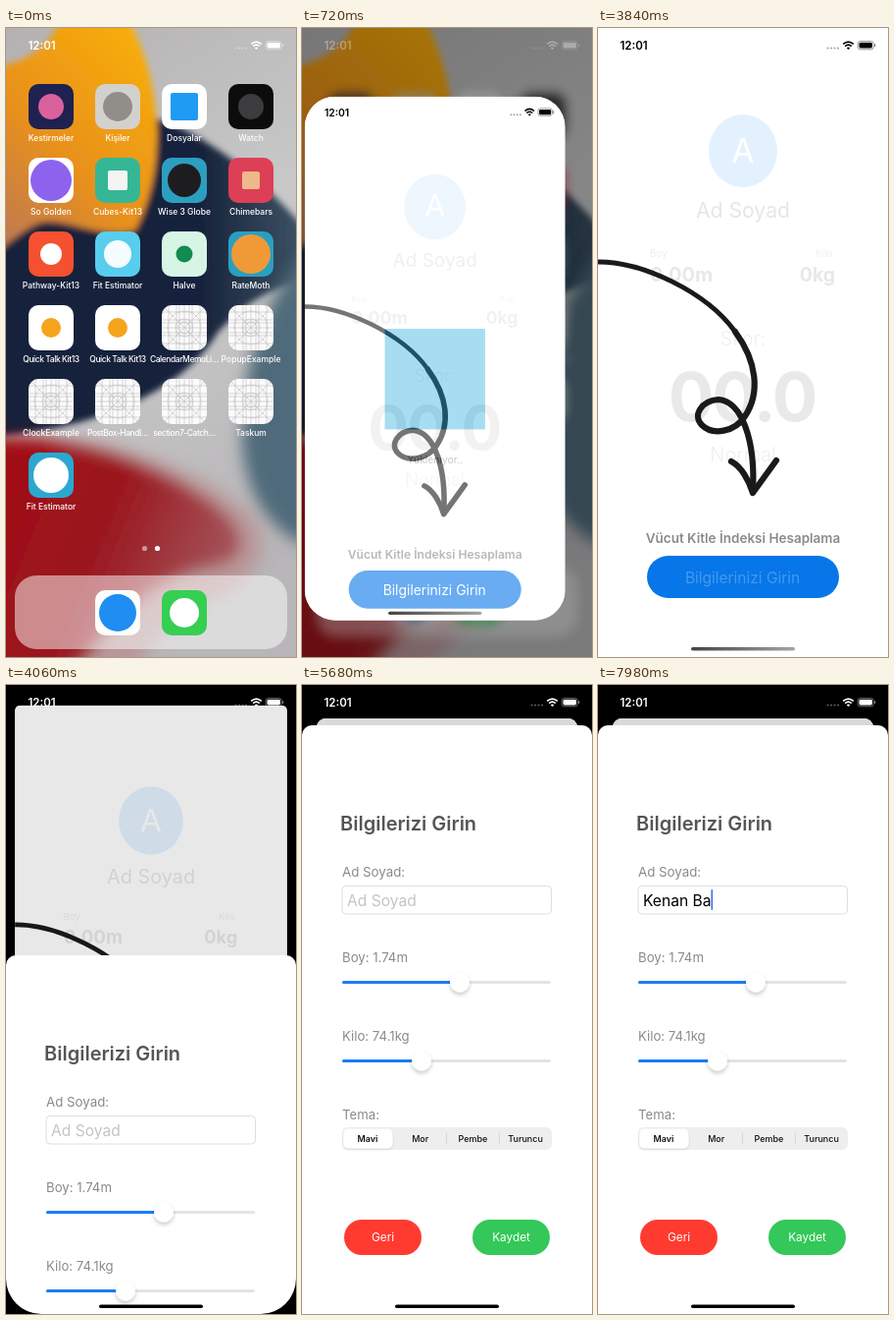
An HTML page for the animation above (8 s loop, 296x640 px).

```html
<!DOCTYPE html>
<html lang="tr">
<head>
<meta charset="utf-8">
<title>Uygulama</title>
<style>
  html, body { margin: 0; width: 100%; height: 100%; overflow: hidden; background: #000; }
  svg { display: block; width: 296px; height: 640px; }
  text { font-family: Inter, Roboto, "Liberation Sans", sans-serif; white-space: pre; }
</style>
</head>
<body>
<svg id="stage" viewBox="0 0 296 640" xmlns="http://www.w3.org/2000/svg"></svg>
<script>
const LOOP = 8000, STEP = 110;
const OPEN = 500, PRESS = 3840, SETTLE = 5680, FOCUS = 6260;

// Window opening: width progress, height progress, app fade-in
const GROW = [.2, .674, .88, .955, .985, 1];
const TALL = [.12, .566, .82, .93, .98, 1];
const FADE = [0, .35, .6, .8, .95, 1];
// Top edge of the sheet while it slides up
const SHEET_Y = [640, 510, 275, 130, 66, 42];

const TYPED = 'Kenan Ba';
const KEYS = [[6580, 2], [6920, 4], [7120, 5], [7310, 6], [7770, 7], [7980, 8]];

// ---- drawing helpers ----
const rect = (x, y, w, h, r, fill, more = '') =>
  `<rect x="${x}" y="${y}" width="${w}" height="${h}" rx="${r}" fill="${fill}" ${more}/>`;
const disc = (x, y, r, fill, more = '') =>
  `<circle cx="${x}" cy="${y}" r="${r}" fill="${fill}" ${more}/>`;
const label = (x, y, size, str, fill, weight = 400, anchor = 'middle', more = '') =>
  `<text x="${x}" y="${y}" font-size="${size}" fill="${fill}" font-weight="${weight}" text-anchor="${anchor}" ${more}>${str}</text>`;
const left = (x, y, size, str, fill, weight, more) =>
  label(x, y, size, str, fill, weight, 'start', more);

const status = id => `<g id="${id}" fill="currentColor">
  ${left(22.5, 22, 11.5, '12:01', 'currentColor', 600)}
  ${[234.5, 238, 241.5, 245].map(x => disc(x, 20.5, 1.1, 'currentColor', 'opacity=".35"')).join('')}
  <g fill="none" stroke="currentColor" stroke-width="1.7">
    <path d="M250.2 16.4Q255.5 11.8 260.8 16.4M252.2 18.6Q255.5 15.8 258.8 18.6"/>
  </g>
  <path d="M253.8 20.2Q255.5 18.9 257.2 20.2L255.5 22Z"/>
  ${rect(265.2, 13.4, 16, 8.4, 2.4, 'none', 'stroke="currentColor" stroke-width=".8" opacity=".5"')}
  ${rect(266.5, 14.7, 13.4, 5.8, 1.4, 'currentColor')}
  ${rect(282, 16, 1.2, 3.2, .6, 'currentColor', 'opacity=".5"')}
</g>`;

// ---- home screen ----
// label, tile colour, mark colour, mark shape (c circle, s square), mark half size
const APPS = [
  ['Kestirmeler', '#1f2150', '#d9619c', 'c', 13],
  ['Kişiler', '#d3d1ce', '#918d89', 'c', 15],
  ['Dosyalar', '#fff', '#1f9bf4', 's', 14],
  ['Watch', '#0c0c0d', '#3c3c3e', 'c', 13],
  ['So Golden', '#fff', '#8d63ee', 'c', 21],
  ['Cubes-Kit13', '#35b796', '#f4f4f2', 's', 10],
  ['Wise 3 Globe', '#2c9fc1', '#1d1d20', 'c', 17],
  ['Chimebars', '#dc3f56', '#efb98c', 's', 9],
  ['Pathway-Kit13', '#f5502f', '#fff', 'c', 11],
  ['Fit Estimator', '#58cdee', '#f4fcff', 'c', 14],
  ['Halve', '#d6f5e5', '#128a50', 'c', 8.5],
  ['RateMoth', '#2a9fc2', '#f09a37', 'c', 20],
  ['Quick Talk Kit13', '#fff', '#f5a41d', 'c', 10],
  ['Quick Talk Kit13', '#fff', '#f5a41d', 'c', 10],
  ['CalendarMemoLi…'], ['PopupExample'], ['ClockExample'],
  ['PostBox-Handl…'], ['section7-Catch…'], ['Taskum'],
  ['Fit Estimator', '#2aa8cf', '#fff', 'c', 18]
];

const mark = (shape, r, fill) => shape === 'c'
  ? disc(23, 23, r, fill) : rect(23 - r, 23 - r, 2 * r, 2 * r, 2, fill);

const blank = () => {
  let lines = '';
  for (const p of [7, 15, 18, 23, 28, 31, 39]) lines += `M${p} 0V46M0 ${p}H46`;
  return rect(0, 0, 46, 46, 10, '#fbfbfb') +
    `<g fill="none" stroke="#bdbdbf" stroke-width=".6"><path d="${lines}M3 3L43 43M43 3L3 43"/>` +
    [6, 9, 17].map(r => disc(23, 23, r, 'none')).join('') + '</g>';
};

const tile = (x, y, [, bg, fg, shape, r]) => `<g transform="translate(${x} ${y})">` +
  (bg ? rect(0, 0, 46, 46, 10, bg) + mark(shape, r, fg) : blank()) + '</g>';

const icons = APPS.map((app, i) => {
  const cx = 46 + 68 * (i % 4), y = 57 + 75 * Math.floor(i / 4);
  const tight = app[0].length > 13 ? 'letter-spacing="-.45"' : '';
  return tile(cx - 23, y, app) + label(cx, y + 58, 8.5, app[0], '#fff', 500, 'middle', tight);
}).join('');

const wallpaper = `
  ${rect(0, 0, 296, 640, 0, 'url(#base)')}
  <g filter="url(#soft)">
    <path fill="url(#night-sea)" d="M-20 225L140 88C200 104 262 150 320 222V256C264 262 240 285 216 310C180 370 90 410 -20 416Z"/>
    <path fill="url(#sun)" d="M58 -15H122C164 60 162 150 132 206C94 216 52 188 30 200C5 213 -20 240 -20 240V42C20 36 46 20 58 -15Z"/>
  </g>
  <g filter="url(#softer)">
    <path fill="#506b7a" d="M320 215C270 260 240 330 241 420C244 480 275 520 320 530Z"/>
    <path fill="#b98a8c" opacity=".7" d="M-20 425C80 400 190 445 245 490C275 520 262 560 215 580C160 600 140 640 120 670H-20Z"/>
    <path fill="url(#ruby)" d="M-20 417C60 410 150 440 208 482C250 512 250 540 212 548C140 560 95 625 60 670H-20Z"/>
  </g>`;

const home = `<g id="home">${wallpaper}
  <g id="icons">
    ${rect(9, 557, 278, 75, 22, '#fff', 'fill-opacity=".5"')}
    ${icons}
    ${disc(141.5, 529.5, 2.6, '#fff', 'opacity=".5"')}${disc(154.5, 529.5, 2.6, '#fff')}
    ${tile(91, 572, ['', '#fdfdfd', '#1f8df2', 'c', 19])}
    ${tile(159, 572, ['', '#35cf52', '#fff', 'c', 15])}
  </g>
  ${rect(0, 0, 296, 640, 0, '#000', 'id="shade"')}</g>`;

// ---- app screens ----
const launch = `${rect(0, 0, 296, 640, 0, '#fff')}
  ${rect(91, 263, 114, 114, 0, '#25aadb')}
  ${label(148, 415, 11.5, 'Yükleniyor..', '#777')}`;

const main = `<g id="main">
  ${rect(0, 0, 296, 640, 0, '#fff')}
  <ellipse cx="148" cy="125" rx="35" ry="37" fill="#e3f1fe"/>
  ${label(148, 136.5, 34, 'A', '#fff')}
  ${label(148, 193, 21.2, 'Ad Soyad', '#e6e6e6')}
  ${left(53, 233, 10, 'Boy', '#efefef')}
  ${left(53, 258, 20, '0.00m', '#e8e8e8', 700)}
  ${label(230.5, 233, 10, 'Kilo', '#efefef')}
  ${label(224, 258, 19.5, '0kg', '#e8e8e8', 700)}
  ${label(148, 323, 19.5, 'Skor:', '#efefef', 300)}
  ${label(147, 400, 69, '00.0', '#e9e9e9', 700, 'middle', 'letter-spacing="-2"')}
  ${label(148, 441, 20, 'Normal', '#efefef', 300)}
  <g fill="none" stroke="#1a1a1c" stroke-width="6.2" stroke-linecap="round" stroke-linejoin="round">
    <path stroke-width="5" d="M-4 238C45 236 112 270 140 309"/>
    <path d="M140 309C162 339 166 371 150 395C140 411 117 415 106 404C96 394 106 379 123 378C147 380 161 420 158 472"/>
    <path d="M136 441C146 446 154 460 158 473C166 462 174 451 182 440"/>
  </g>
  ${label(148, 524, 13.5, 'Vücut Kitle İndeksi Hesaplama', '#8a8a8a', 600)}
  ${rect(50, 537, 196, 43, 21.5, '#0676e8')}
  ${label(147.5, 564.5, 15.5, 'Bilgilerinizi Girin', '#fff', 400, 'middle', 'id="cta"')}
</g>
${status('appBar')}
${rect(95, 630, 106, 3.6, 1.8, 'url(#bar)', 'id="handle"')}`;

const slider = (y, x) => rect(41, y - 1.5, 213, 3, 1.5, '#e4e4e5') +
  rect(41, y - 1.5, x - 41, 3, 1.5, '#1a7cf8') + disc(x, y, 10, '#fff', 'filter="url(#drop)"');

const segments = rect(41, 450, 214, 23, 6, '#eeeeef') +
  rect(42, 451.5, 50.5, 20, 5, '#fff', 'filter="url(#thin)"') +
  `<path d="M147.5 455.5V467.5M201.5 455.5V467.5" stroke="#d6d6d8" stroke-width="1"/>` +
  ['Mavi', 'Mor', 'Pembe', 'Turuncu'].map((s, i) =>
    label(67 + 53.7 * i, 464.8, 9, s, '#111', i ? 500 : 600)).join('');

const pill = (x, fill, str) => rect(x, 544, 79, 36, 18, fill) +
  label(x + 39.5, 566.3, 11.8, str, '#fff');

const sheet = `<g id="sheet">
  ${rect(0, 41, 296, 700, 10, '#fff')}
  ${left(39, 147.5, 20, 'Bilgilerizi Girin', '#555', 600)}
  ${left(41, 195, 13.3, 'Ad Soyad:', '#8a8a8a')}
  ${rect(41, 204.5, 213.5, 28.5, 4, '#fff', 'stroke="#dedee0" stroke-width="1"')}
  ${left(46, 224.5, 15.6, 'Ad Soyad', '#c4c4c7', 400, 'id="hint"')}
  ${left(46, 224.5, 15.6, '', '#000', 400, 'id="typed"')}
  ${rect(46, 208, 1.6, 21, .8, '#3c6df0', 'id="caret"')}
  ${left(41, 282, 13.2, 'Boy: 1.74m', '#8a8a8a')}${slider(302.5, 161)}
  ${left(41, 362, 13.2, 'Kilo: 74.1kg', '#8a8a8a')}${slider(382.5, 122)}
  ${left(41, 442, 13.2, 'Tema:', '#8a8a8a')}${segments}
  ${pill(43, '#ff3b30', 'Geri')}${pill(174, '#34c759', 'Kaydet')}
</g>`;

const stops = (...list) => list.map(([o, c]) => `<stop offset="${o}" stop-color="${c}"/>`).join('');
const defs = `<defs>
  <linearGradient id="base" x2=".3" y2="1">${stops([0, '#b3b1b1'], [.5, '#c9c8c9'], [1, '#b8b6b8'])}</linearGradient>
  <linearGradient id="night-sea">${stops([0, '#14203a'], [.65, '#18243c'], [1, '#435a6b'])}</linearGradient>
  <linearGradient id="sun" x1=".8" y1="0" x2=".1" y2="1">${stops([0, '#f8ae08'], [.55, '#e8901c'], [1, '#b9765a'])}</linearGradient>
  <linearGradient id="ruby" x2="1" y2=".4">${stops([0, '#a30e17'], [.5, '#9a141c'], [1, '#a4545a'])}</linearGradient>
  <linearGradient id="bar">${stops([0, '#444'], [1, '#a4a4a4'])}</linearGradient>
  <filter id="soft"><feGaussianBlur stdDeviation="3"/></filter>
  <filter id="softer"><feGaussianBlur stdDeviation="8"/></filter>
  <filter id="drop" x="-50%" y="-50%" width="200%" height="200%"><feDropShadow dx="0" dy="2.5" stdDeviation="2.2" flood-opacity=".22"/></filter>
  <filter id="thin" x="-20%" y="-30%" width="140%" height="170%"><feDropShadow dx="0" dy="1" stdDeviation="1" flood-opacity=".14"/></filter>
  <clipPath id="clip"><rect id="frame"/></clipPath>
</defs>`;

const stage = document.getElementById('stage');
stage.innerHTML = defs + rect(0, 0, 296, 640, 0, '#000') + home +
  `<g id="win" clip-path="url(#clip)"><g id="view">${launch}${main}
    ${rect(0, 0, 296, 640, 0, '#000', 'id="dim"')}</g>
    ${rect(0, 0, 296, 640, 0, '#2aa8cf', 'id="cover"')}</g>` +
  sheet + rect(95, 630.5, 106, 3.6, 1.8, '#000', 'id="sheetBar"') +
  `<path id="corners" d="M0 604V640H36A36 36 0 0 1 0 604ZM296 604V640H260A36 36 0 0 0 296 604Z"/>` +
  status('topBar');

// ---- animation ----
const el = {};
stage.querySelectorAll('[id]').forEach(e => el[e.id] = e);
const set = (id, attrs) => { for (const k in attrs) el[id].setAttribute(k, attrs[k]); };
const show = (id, on) => { el[id].style.display = on ? '' : 'none'; };
const mix = (a, b, p) => a + (b - a) * p;
const stepAt = (t, start) => Math.min(5, Math.floor((t - start) / STEP));

function placeWindow(x, y, w, h, r) {
  const s = w / 296;
  set('frame', { x, y, width: w, height: h, rx: r });
  set('view', { transform: `translate(${x} ${y}) scale(${s})` });
  set('handle', { y: Math.min(640, h / s) - 10 });
}

function drawOpening(t) {
  const i = stepAt(t, OPEN), opening = t >= OPEN;
  const p = opening ? GROW[i] : 0, q = opening ? TALL[i] : 0;
  const h = mix(45, 640, q), cy = mix(455, 320, p);
  placeWindow(mix(23, 0, p), cy - h / 2, mix(45, 296, p), h, mix(10, 34, p));
  set('main', { opacity: opening ? FADE[i] : 0 });
  set('cover', { opacity: Math.max(0, 1 - 1.8 * p) });
  set('shade', { opacity: .55 * Math.max(0, p - .7) / .3 });
  set('icons', { transform: `translate(148 320) scale(${1 - .045 * p}) translate(-148 -320)`, opacity: 1 - .2 * p });
  el.icons.style.filter = opening ? `blur(${(6 * Math.min(1, p * 1.2)).toFixed(2)}px)` : 'none';
  el.topBar.style.color = '#fff';
  set('topBar', { opacity: 1 - .75 * p });
}

function drawSheet(t) {
  const i = stepAt(t, PRESS), y = t >= SETTLE ? 41 : SHEET_Y[i];
  const b = Math.min(1, (640 - y) / 598);
  placeWindow(15 * b, 34 * b, 296 - 30 * b, 640, 9 * b);
  set('main', { opacity: 1 });
  set('cover', { opacity: 0 });
  set('dim', { opacity: .15 * b });
  set('sheet', { transform: `translate(0 ${y - 41})` });
  el.topBar.style.color = b < .4 ? '#000' : '#fff';
  set('topBar', { opacity: 1 });
}

function drawTyping(t) {
  let n = 0;
  for (const [at, count] of KEYS) if (t >= at) n = count;
  el.typed.textContent = TYPED.slice(0, n);
  show('hint', n === 0);
  show('caret', t >= FOCUS);
  set('caret', { x: 46 + (n ? el.typed.getComputedTextLength() : 0) });
}

function draw(t) {
  const open = t >= OPEN, pressed = t >= PRESS, sliding = t >= PRESS + STEP;
  show('home', !pressed);
  show('win', open);
  show('sheet', sliding);
  show('sheetBar', sliding);
  show('corners', sliding && t < SETTLE);
  show('appBar', !pressed);
  show('handle', !sliding);
  show('topBar', pressed || t < OPEN + 5 * STEP);
  set('cta', { opacity: pressed && !sliding ? .25 : 1 });
  set('dim', { opacity: 0 });
  if (pressed) drawSheet(t); else drawOpening(t);
  drawTyping(t);
}

const start = performance.now();
function tick() {
  draw((performance.now() - start) % LOOP);
  requestAnimationFrame(tick);
}
tick();
</script>
</body>
</html>
```
